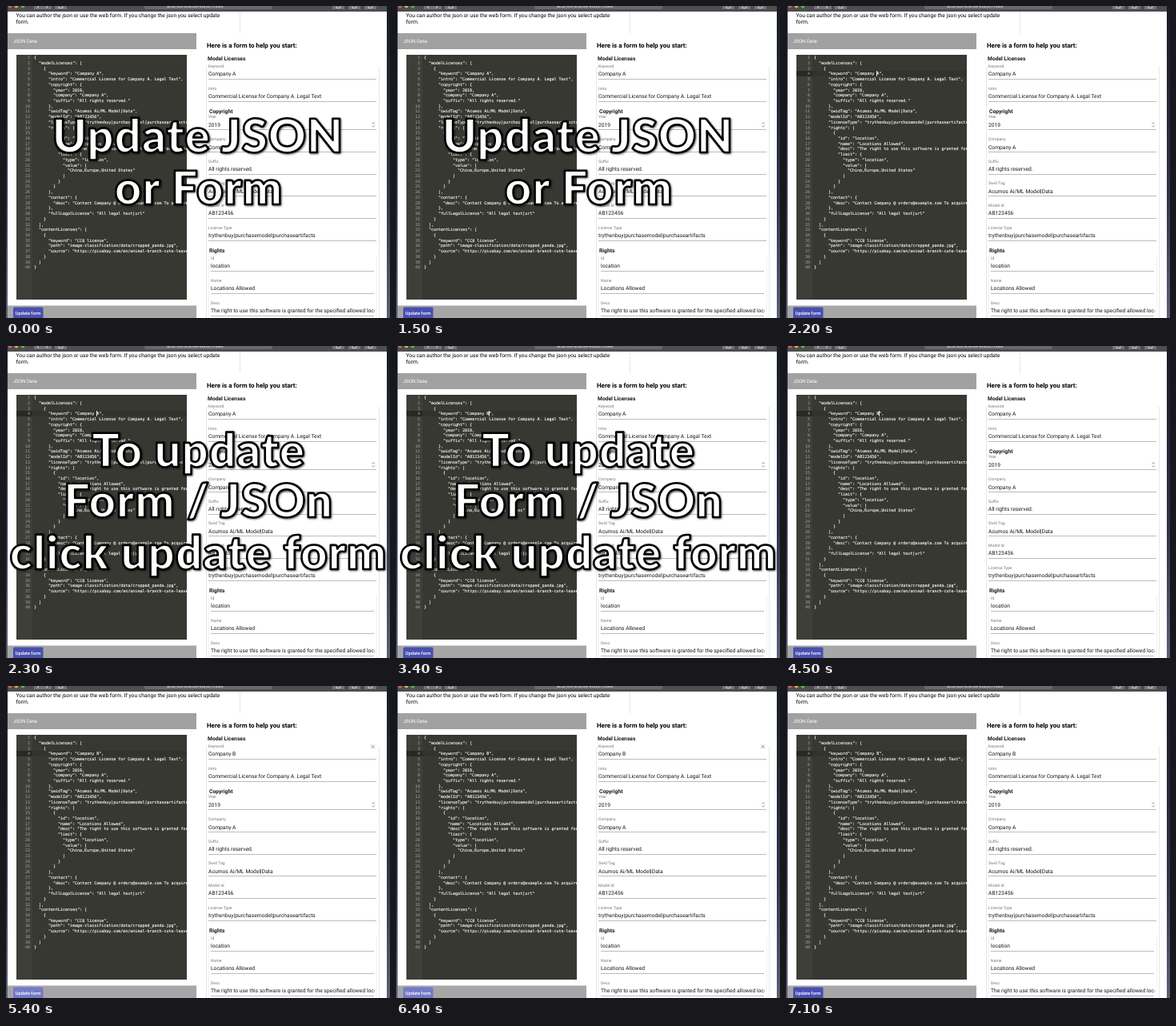
These frames come from a looping animation (480x390 px, 7200 ms). An HTML page:

```html
<!DOCTYPE html>
<html lang="en">
<head>
<meta charset="utf-8">
<title>License editor</title>
<style>
html, body { margin: 0; width: 100%; height: 100%; overflow: hidden; background: #fff; }
svg { display: block; width: 480px; height: 390px; font: 6.72px Roboto, sans-serif; text-rendering: geometricPrecision; }
.code { font: 5px "DejaVu Sans Mono", monospace; fill: #fff; stroke: #fff; stroke-width: .12px; }
.code rect { stroke: none; }
.code .num { fill: #a9aaa3; stroke: none; text-anchor: end; }
.label { font-size: 5.1px; fill: #777; }
.head { font-weight: 700; }
.rule { stroke: #aaa; stroke-width: .8px; shape-rendering: crispEdges; }
.big { font: 900 58px Lato, sans-serif; letter-spacing: 1px; fill: #fff; stroke: #000; stroke-width: 2.6px;
  stroke-linejoin: round; text-anchor: middle; filter: drop-shadow(1.2px 1.8px 1px rgba(0,0,0,.6)); }
</style>
</head>
<body>
<svg id="stage" viewBox="0 0 480 390">
  <defs>
    <linearGradient id="desk" x2="0" y2="1">
      <stop stop-color="#171c2b"/><stop offset=".6" stop-color="#30364a"/><stop offset="1" stop-color="#596076"/>
    </linearGradient>
    <clipPath id="editorClip"><path d="M13 61H226V367H13z"/></clipPath>
    <clipPath id="fieldClip"><path d="M250 0H460.5V390H250z"/></clipPath>
  </defs>

  <rect width="480" height="390" fill="#fff"/>
  <path d="M292.5 7V34M250.5 76V390M466.5 76V390" stroke="#ddd" stroke-width=".7"/>
  <path d="M253.5 312V390M463.5 312V390" stroke="#e8e8e8" stroke-width=".6"/>

  <g id="toolbar">
    <rect width="480" height="7" fill="#4e4e50"/>
    <circle cx="5" r="2.4" fill="#e0605a"/>
    <circle cx="13" r="2.4" fill="#dfb043"/>
    <circle cx="21" r="2.4" fill="#5cb851"/>
    <path d="M35 0H57V4H35zM61 0H76V4H61zM408 0H423V4H408zM428 0H443V4H428zM448 0H463V4H448z" fill="#747476"/>
    <rect x="173" y="-4" width="160" height="8" rx="2" fill="#69696b"/>
    <path d="M41 0L39 1.2 41 2.6M50 0L52 1.2 50 2.6M66 0V2.5H71V0M413 0V2.5H418V0M433 0V2.5H438V0M453 0V2.5H458V0"
      fill="none" stroke="#ddd" stroke-width=".8"/>
    <text x="201" y="2" font-size="5.6" fill="#eee">acumos-license-editor/index</text>
  </g>

  <text x="12.5" y="14.4">You can author the json or use the web form. If you change the json you select update</text>
  <text x="12.5" y="22.4">form.</text>

  <rect x="2" y="34" width="236" height="20" fill="#a1a1a1"/>
  <text x="9" y="46.4" font-size="6.05" fill="#fff">JSON Data:</text>
  <rect x="2" y="374.5" width="236" height="16" fill="#a6a6a6"/>
  <rect id="button" x="9" y="376.5" width="37.5" height="18" rx="1.5"/>
  <text x="11.8" y="386.2" font-size="5.7" font-weight="500" fill="#fff">Update form</text>

  <g id="editor" class="code" clip-path="url(#editorClip)">
    <rect x="13" y="61" width="213" height="306" fill="#373832"/>
    <rect x="13" y="61" width="20" height="306" fill="#3e3f38"/>
    <g id="activeLine">
      <rect x="13" y="81.1" width="213" height="6.7" fill="#32332d"/>
      <rect x="13" y="81.1" width="20" height="6.7" fill="#282925"/>
    </g>
    <g id="lines"></g>
    <rect id="caret" y="81" width=".9" height="6.7"/>
  </g>

  <text x="251" y="52" class="head" font-size="7.95">Here is a form to help you start:</text>
  <g id="form" fill="#181818"></g>
  <path d="M457.8 147.3L459.3 145.6 460.8 147.3M457.8 149.5L459.3 151.2 460.8 149.5" fill="none" stroke="#666" stroke-width=".7"/>
  <path id="clear" d="M456.5 73.7L460.7 77.9M460.7 73.7L456.5 77.9" stroke="#777" stroke-width=".8"/>

  <rect width="2" height="390" fill="url(#desk)"/>
  <rect x="476" width="4" height="390" fill="url(#desk)"/>

  <g id="titleA" class="big">
    <text x="240" y="182.5">Update JSON</text>
    <text x="241" y="247.5">or Form</text>
  </g>
  <g id="titleB" class="big">
    <text x="240.5" y="150.5">To update</text>
    <text x="240.5" y="214">Form / JSOn</text>
    <text x="240.5" y="278.5">click update form</text>
  </g>
</svg>
<script>
const LOOP = 7200, CHAR = 3, PITCH = 6.72, CODE_X = 35;
const $ = id => document.getElementById(id);
const grant = "The right to use this software is granted for the specified allowed locations";

const license = {
  modelLicenses: [{
    keyword: "Company A",
    intro: "Commercial License for Company A. Legal Text",
    copyright: { year: 2019, company: "Company A", suffix: "All rights reserved." },
    swidTag: "Acumos Ai/ML Model|Data",
    modelId: "AB123456",
    licenseType: "trythenbuy|purchasemodel|purchaseartifacts",
    rights: [{
      id: "location", name: "Locations Allowed", desc: grant,
      limit: { type: "location", value: ["China,Europe,United States"] }
    }],
    contact: { desc: "Contact Company @ orders@example.com To acquire a license" },
    fullLegalLicense: "All legal text|url"
  }],
  contentLicenses: [{
    keyword: "CC0 license",
    path: "image-classification/data/cropped_panda.jpg",
    source: "https://pixabay.com/en/animal-branch-cute-leaves"
  }]
};

$("lines").innerHTML = JSON.stringify(license, null, 2).split("\n").map((line, i) => {
  const code = line.trimStart(), y = 66.2 + i * PITCH;
  const x = CODE_X + (line.length - code.length) * CHAR;
  return `<text class="num" x="30" y="${y}">${i + 1}</text><text x="${x}" y="${y}">${code}</text>`;
}).join("");
const keywordLine = $("lines").children[7];

const heading = (text, x, y) => `<text class="head" x="${x}" y="${y}">${text}</text>`;
// y is the middle of the label
const field = (label, value, y, x = 253) => `
  <text class="label" x="${x}" y="${y + 1.8}">${label}</text>
  <text class="value" x="${x}" y="${y + 12.1}" clip-path="url(#fieldClip)">${value}</text>
  <path class="rule" d="M${x} ${y + 16.3}H${x > 253 ? 460 : 462.5}"/>`;

const model = license.modelLicenses[0], right = model.rights[0];
$("form").innerHTML =
  heading("Model Licenses", 252, 68) +
  field("Keyword", model.keyword, 75) +
  field("Intro", model.intro, 102.8) +
  heading("Copyright", 254, 133.8) +
  field("Year", 2019, 138.6) +
  field("Company", model.copyright.company, 166.4) +
  field("Suffix", model.copyright.suffix, 194) +
  field("Swid Tag", model.swidTag, 221.6) +
  field("Model Id", model.modelId, 249.3) +
  field("License Type", model.licenseType, 277) +
  heading("Rights", 254, 308.4) +
  field("Id", right.id, 315.2, 256) +
  field("Name", right.name, 343, 256) +
  field("Desc", right.desc, 370.7, 256);
const keywordField = $("form").querySelector(".value");

const show = (id, on) => $(id).style.display = on ? "" : "none";
const within = (t, from, to) => t >= from && t < to;
const ramp = (t, from, to) => Math.min(1, Math.max(0, (t - from) / (to - from)));

function draw(t) {
  show("titleA", t < 1600);
  show("titleB", within(t, 2300, 4500));
  show("activeLine", t >= 1900);

  // Select the letter, erase it, type the new one
  const letter = t < 3100 ? "A" : t < 3400 ? "" : "B";
  keywordLine.textContent = `"keyword": "Company ${letter}",`;
  const column = t < 2600 ? 20 : 20 + letter.length;
  $("caret").setAttribute("x", CODE_X + (6 + column) * CHAR);
  show("caret", within(t, 1900, 2500) || within(t, 2600, 3900) || within(t, 4400, 4900));

  // Click on the button, then hover over the form
  keywordField.textContent = "Company " + (t < 5200 ? "A" : "B");
  show("clear", within(t, 5400, 6500));
  const glow = ramp(t, 4900, 5200) * (1 - ramp(t, 6400, 6800));
  $("button").setAttribute("fill", `rgb(${72 + 44 * glow},${80 + 42 * glow},${176 + 22 * glow})`);
}

function tick() {
  draw(performance.now() % LOOP);
  requestAnimationFrame(tick);
}
tick();
</script>
</body>
</html>
```
